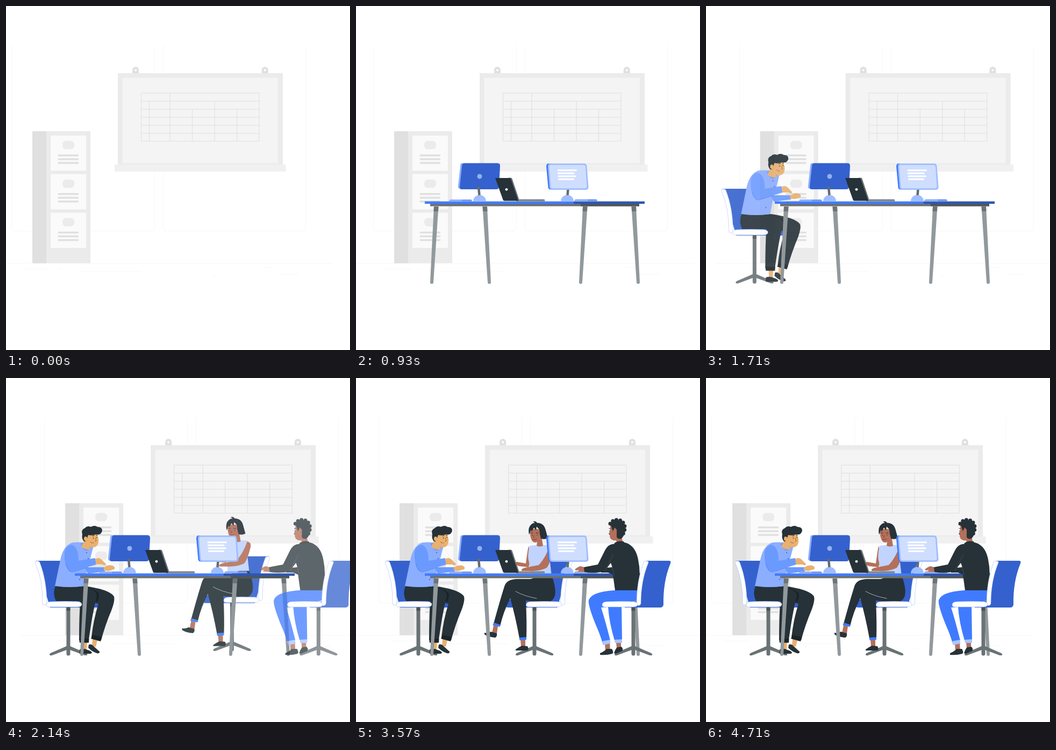
An HTML page for the animation above (4.78 s loop, 640 by 640 pixels).

```html
<!DOCTYPE html>
<html lang="en">
<head>
<meta charset="utf-8">
<title>Office team</title>
<style>
  html, body { margin: 0; width: 100%; height: 100%; overflow: hidden; background: #fff }
  svg { display: block; width: 100%; height: 100% }
  .ink { fill: #263238 } .cuff { fill: #1a2327 } .royal { fill: #3461cd } .blue { fill: #407bff }
  .sky { fill: #8caeff } .azure { fill: #6b9aff } .pale { fill: #9fbdff } .white { fill: #fff }
  .tan { fill: #e9b06f } .brown { fill: #b4705b }
  .wall { fill: #ebebeb } .mid { fill: #e0e0e0 }
  .line { fill: none; stroke: #e0e0e0; stroke-width: 1.1 }
  .faint { fill: none; stroke: #f7f7f7 }
  .round { fill: none; stroke-linecap: round; stroke-linejoin: round }
  .pad { fill: #fff; stroke: #8caeff; stroke-width: .5 }
</style>
</head>
<body>
<svg viewBox="0 0 640 640">
  <defs>
    <g id="drawer">
      <path fill="#fafafa" d="M83 241h66v65.500h-66z"/>
      <rect class="wall" x="105" y="251" width="22" height="15.500" rx="6.500"/>
      <path class="round" stroke="#e0e0e0" stroke-width="3.500" d="M98 278h35.500M98 285h35.500M98 292h35.500"/>
    </g>
    <g id="hook">
      <path class="mid" d="M235 126v-7a6 6 0 0 1 12 0v7z"/>
      <circle class="white" cx="241" cy="119.500" r="2"/>
    </g>
    <g id="leg">
      <path fill="#92999c" d="M145 373h8.500L144 514a3 3 0 0 1-6 0z"/>
      <path fill="#6c7478" d="M145 373h8.500l-.6 9h-8.400z"/>
    </g>
    <g id="base">
      <path fill="#697275" d="M112.500 426h7v73l30 13q3 2 1 4l-4 0-27-10v7a3.500 3.500 0 0 1-7 0v-7l-27 10q-5 1-4.500-2l1.500-2 30-13z"/>
      <path fill="#4b5458" d="M112.500 426h7v7h-7z"/>
    </g>
    <g id="back">
      <path class="royal" d="M56 340h50v72h73v10q0 5-6 5H82z"/>
      <path class="pad" d="M54 343q0-3 5-2.500 3 0 4 3 13 34 13 75-1 4-5 4-3 0-3-4 1-42-14-75.500z"/>
    </g>
    <path id="seat" class="pad" d="M75 422q0-6 10-6 24-1 48 0 8 1 8 5 0 5-9 5H80q-5 0-5-4z"/>
    <g id="stand">
      <path class="pale" d="M218 363.500a12 12 0 0 1 24 0z"/>
      <path stroke="#646c70" stroke-width="4.500" d="M228 336l1.500 16"/>
    </g>
  </defs>

  <g id="room">
    <path class="faint" d="M10.500 74V412q0 7 7 7H269.500q7 0 7-7V74M292.500 74V412q0 7 7 7H550.500q7 0 7-7V74"/>
    <path class="faint" d="M-34 478.500H608M33 489.500h49M96 489.500h8M136 494.500h116M479 486.500h19M505 499h40M384 502.500h8"/>
    <path class="wall" d="M49 233h108v245.500H49z"/>
    <path class="mid" d="M49 233h26v245.500H49z"/>
    <use href="#drawer"/><use href="#drawer" y="71.800"/><use href="#drawer" y="143.500"/>
    <use href="#hook"/><use href="#hook" x="240.700"/>
    <path class="wall" d="M208 125h307v170H208z"/>
    <path fill="#f4f4f4" d="M216.500 133.500h289.500v159H216.500z"/>
    <path fill="#f0f0f0" d="M202 295h318.500v13H202z"/>
    <path class="line" d="M251.500 162H471V251.500H251.500zM251.500 177H471M251.500 192H471M251.500 207H471M251.500 222H471M251.500 237H471M305 162V251.500M266.500 177V251.500M388 177V251.500M346.500 192V251.500M429.500 192V251.500"/>
  </g>

  <g id="man">
    <use href="#back"/><use href="#base"/>
    <path class="tan" d="M142 490h9l-1 15h-7zM161 485l9 3-3 12-7-2z"/>
    <path class="ink" d="M137 505q7-3 15 1 8 2 8 6l-3 1h-20zM154 496q5-2 9 3l11 10q1 4-5 3-9-3-16-10z"/>
    <path class="ink" d="M92 387q27 3 54 0 44 6 54 18 4 5-3 25-13 31-20 58l-18-6q4-34 13-62l-20-5H93q-7-14-1-28z"/>
    <path class="cuff" d="M140 389q34 4 33 16l-3 11-14-4z"/>
    <path class="ink" d="M128 390q42-1 41 16-8 30-15 81h-18q0-42 2-72z"/>
    <path class="cuff" d="M136 485h18.500l-.5 7.500h-17zM161 478l17 4-2 8-18-5z"/>
    <path class="sky" d="M124 306q-16 5-22 28l-11 53q27 4 54 0l5-26 13-49q-14-8-39-6z"/>
    <path class="azure" d="M146 352l37 0 1 8-32 4zM139 308q3 12 11 13 9-4 10-12-10-6-21-1z"/>
    <path class="azure" d="M122 310q-11 2-13 14-1 26 8 35 6 5 31-6l20-6-2-12-31 5q0-26-13-30z"/>
    <path class="round" stroke="#5686f0" stroke-width=".8" d="M112 346q4 15 11 15l27-8"/>
    <path class="tan" d="M166 337q7-5 14 3l6 6q0 4-7 1l-11 0zM182 353q10-7 18-3 4 3 1 6l-11 3-8-1z"/>
    <path class="tan" d="M149 290q10 3 20-1l3 10q1 10-4 14-6 4-12 1l1 4q-9 3-17-4l6-13z"/>
    <path class="ink" d="M145 304q-5-6-3-13-3-9 5-12 4-5 11-2 7-4 12 0 9 0 9 7-2 9-12 7-7 3-14 1-2 7-5 12z"/>
    <ellipse class="tan" cx="148" cy="299" rx="3" ry="4"/>
    <path class="round" stroke="#263238" d="M162.500 297v1.500M169 296v1.500M161 294l3-1M168 293l2-.5"/>
    <path class="round" stroke="#9b5f35" stroke-width=".9" d="M157 305q3 3 6 2M166 298l2 5-2 1"/>
    <path class="round" stroke="#3461cd" stroke-width="2" d="M150 325h.1M153 336h.1M137 375h.1"/>
    <use href="#seat"/>
  </g>

  <g id="woman">
    <g transform="matrix(-1 0 0 1 456.500 0)"><use href="#back"/></g>
    <use href="#base" x="216"/>
    <path class="brown" d="M256 460l8 2-2 14-9-1zM306 486h9v14h-8z"/>
    <path class="ink" d="M239 474q7 1 12-2l11 3q1 6-3 8-13-1-20-6zM297 505q7-5 12-7l10 1q3 5 0 8h-22z"/>
    <path class="brown" d="M321 312q-3 16-5 33l-17-3-4 4 8 4 18 2 5-15z"/>
    <path fill="#c0d4ff" d="M323 312q18-3 39-1 2 20-1 31l3 27h-40l-2-26q-4-10 1-31z"/>
    <path class="ink" d="M325 374l21-7h18q9 25 6 38-4 13-20 13l-34-4q2 40 1 69l-13 1q-8-43-17-74-13 25-19 52l-12-5q12-44 20-69 4-14 24-14z"/>
    <path class="round" stroke="#fff" stroke-width=".6" d="M297 397q16 9 39 13"/>
    <path class="blue" d="M256 455l12.500 4-1 4-13-3zM303.500 483l13.500-1v5l-12.500 1z"/>
    <path class="brown" d="M360 313q9 0 6 12-5 20-11 28-9 5-25 6l-21 0q-4-3 5-6l26-5q13-14 20-35z"/>
    <path class="brown" d="M324 281q-1 14 3 21 4 6 10 3l-1 7q6 3 12 0l-2-12v-19z"/>
    <path class="ink" d="M329 267.500q5-2.500 8 2 13 0 16 14 3 11 4 14-6 4-13 1l-2-8-1-9-5-5-1 7-4-5-4 7-2-3q-1 6-3 9-3-13 4-19 3-3 7-3-2-2-4-2z"/>
    <path class="round" stroke="#263238" d="M328 292v1M337 291.500v1M326 288.500l3-.5M335 288l4 .3"/>
    <path class="round" stroke="#74382d" stroke-width=".9" d="M329 300.500q4 1.500 7-1M331.500 293l-1 4"/>
    <use href="#seat" x="241.500"/>
  </g>

  <g id="desk">
    <path fill="#6a7276" d="M138 367h389v5.500H138z"/><path fill="#4d565b" d="M418 367h109v5.500H418z"/>
    <use href="#leg"/><use href="#leg" x="277"/>
    <g transform="matrix(-1 0 0 1 389 0)"><use href="#leg"/><use href="#leg" x="-277"/></g>
    <path class="blue" d="M128 363.500h277v4.500H128z"/><path fill="#2e56b2" d="M405 363.500h132v4.500H405z"/>
    <path class="sky" d="M173 363.500q0-3.500 4-3.500h20v3.500zM406 363.500q0-4 4-4h21v4z"/>
    <path fill="#7099f5" d="M197 360h16q3 0 3 3.500h-19zM431 359.500h15q3 0 3 4h-18z"/>

    <path class="sky" d="M197 292.500h66l-2 48h-67q-5-1-4-6l4-37q0-5 3-5z"/>
    <path class="royal" d="M201 292.500h62.500q5 0 4.500 6l-2 37q0 5.500-5 5.500h-64q-4.500 0-4-5l4-38q.5-5.500 4-5.500z"/>
    <use href="#stand"/>
    <circle fill="#94b0ee" cx="230" cy="317" r="4.500"/>

    <path class="blue" d="M358 293h12v48.500h-8q-4 0-4.500-4l-3.500-39q0-5 4-5.500z"/>
    <g transform="matrix(-1 0 0 1 623 0)"><use href="#stand"/></g>
    <path class="pale" d="M361 293h63q5 0 5.500 5l3 38.500q0 5-5 5.500h-62q-5 0-5.500-5l-3-38.500q0-5 4-5.500z"/>
    <path fill="#cfdeff" d="M362 295.800h61q3.500 0 4 3l2.500 37q0 3-3.500 3.400h-60q-3 0-3.500-3l-3-37q0-3 2.500-3.400z"/>
    <path class="round" stroke="#fff" stroke-width="3" d="M376 305.700h33.500M376.500 311.200h28.500M377 316.700h31.500M377.500 322.200h27"/>

    <path fill="#697175" d="M284 319.500h4q2 0 2.600 2l13 39-3 2z"/>
    <path fill="#80888c" d="M299 359.500h51q2 1 1 4h-53z"/>
    <path class="ink" d="M259 320h26.500q2 0 2.600 2l14 40.500h-26q-2 0-2.600-2z"/>
    <circle class="white" cx="280" cy="341.300" r="2.400"/>
  </g>

  <g id="guest">
    <use href="#base" x="400"/>
    <path class="royal" d="M500 416h35v11h-35z"/>
    <path class="brown" d="M463 494l9-2 1 15-9 0zM484 491h9v12h-8z"/>
    <path class="ink" d="M454 512q8-3 12-8l10 0q4 6 1 9-11 3-23 2zM480 512q3-9 6-11l8-1q4 5 1 8l-12 5z"/>
    <path class="blue" d="M524 395h-44q-42 3-47 18-2 9 13 46 8 18 12 32l15-3q-9-36-17-61l13-1q2 29 12 62l14-1-1-66 40-10z"/>
    <path fill="#a9c4ff" d="M457 490l15-3 1.500 7-13.500 3zM481 487l14-1v7h-13z"/>
    <path class="brown" d="M425 352l-8-2q-9 4-10 7l3 1 5-1-3 3 13 1z"/>
    <path class="ink" d="M483 309l17-3q20 5 25 32 6 28-1 57h-42l-4-29-9-4-13 0-1-5 11-4 11-1-3-8-12 16q-18 4-37 1l-1-9 26-5 13-26q7-14 20-12z"/>
    <path class="round" stroke="#4d595f" stroke-width=".7" d="M479 328l-16 31M476 350l4 16"/>
    <path class="brown" d="M473 274l18 4 5 26-11 3-1-5q-8 1-11-4-1-3-1-6l-2-2 3-6z"/>
    <path class="ink" d="M480 308q6-6 18-4l2 5q-10-2-14 4z"/>
    <path class="ink" d="M473 273q5-9 17-8 11 3 11 15 0 13-8 19-6 1-8-3v-14l-4-4-3 8-3-10z"/>
    <path class="round" stroke="#263238" stroke-width="7" stroke-dasharray="0 7" d="M473 271q5-8 15-7 10 2 12 12 1 14-10 20"/>
    <path class="brown" d="M478 284q4-5 6 1 0 6-4 8z"/>
    <path class="round" stroke="#263238" d="M472 284v1.500M471 280l3 0M471 290h1"/>
    <path class="royal" d="M540 340h42q5 0 3 5-14 34-13 77-1 5-6 5h-44z"/>
    <path class="pad" d="M535 343q1-3 5-2.500 5 0 4 3-14 34-14 76-1 4-5 4-3 0-3-4 0-42 13-76.500z"/>
    <use href="#seat" x="383"/>
  </g>
</svg>
<script>
const LOOP = 4780, FRAMES = 67, STEP = LOOP / FRAMES;
const el = id => document.getElementById(id);

// cubic-bezier(.25, .1, .25, 1)
function ease(x) {
  if (x <= 0) return 0;
  if (x >= 1) return 1;
  let lo = 0, hi = 1, s;
  for (let i = 0; i < 20; i++) {
    s = (lo + hi) / 2;
    const at = .75 * s * (1 - s) + s ** 3;
    if (at < x) lo = s; else hi = s;
  }
  return .3 * s * (1 - s) ** 2 + 3 * s * s * (1 - s) + s ** 3;
}

const entrances = [
  { id: 'desk', start: 0, length: 600, dx: 0, dy: 0 },
  { id: 'man', start: 1090, length: 1000, dx: -256, dy: 0 },
  { id: 'woman', start: 1541, length: 1000, dx: 768, dy: -72 },
  { id: 'guest', start: 1693, length: 1000, dx: 256, dy: 0 }
];

function draw(t) {
  const lead = Math.max(0, 60 * (1 - t / (LOOP / 2)));
  const sway = 31.4 * (1 - Math.cos(2 * Math.PI * (t + lead) / LOOP));
  el('room').setAttribute('transform', `translate(${sway} 0)`);
  for (const { id, start, length, dx, dy } of entrances) {
    const p = ease((t - start) / length);
    el(id).setAttribute('opacity', p);
    el(id).setAttribute('transform', `translate(${dx * (1 - p)} ${dy * (1 - p)})`);
  }
}

const begin = performance.now();
function tick() {
  const t = (performance.now() - begin) % LOOP;
  // the 3 ms keep steps on the early side of their boundaries
  draw(Math.min(FRAMES - 1, Math.floor((t + 3) / STEP)) * STEP);
  requestAnimationFrame(tick);
}
tick();
</script>
</body>
</html>
```
